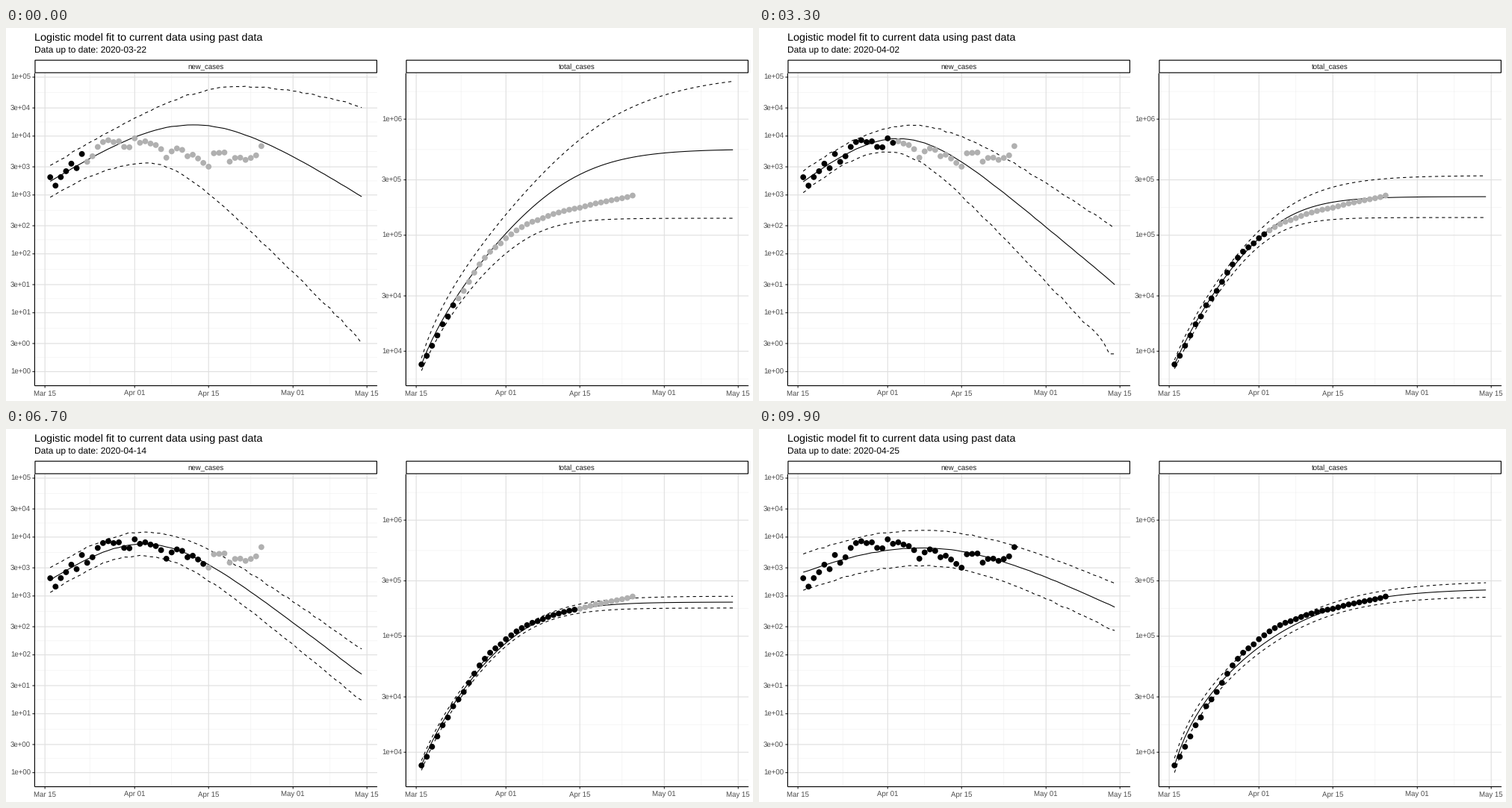
Write a matplotlib script that moves like this. It is 1000 px wide and 500 px high and loops after 10000 ms.

```python
import numpy as np
import matplotlib.pyplot as plt
from matplotlib.animation import FuncAnimation
from matplotlib.patches import Circle, Rectangle

plt.rcParams["font.family"] = "Liberation Sans"
plt.rcParams["text.hinting"] = "none"

W, H = 1000, 500
FRAMES, INTERVAL = 100, 100
FITS = 35                      # one fit per day from 2020-03-22
PX = 0.72                      # points per pixel at 100 dpi
LEFT, RIGHT, PANEL_W = 38.36, 535.36, 458.64
STRIP, TOP, BOTTOM = 42.6, 60.5, 479.5
LINE = 1.16
GREY = "#b0b0b0"
DAYS = np.arange(60)           # 2020-03-16 to 2020-05-14

# Observed daily counts in tens, from 2020-03-16
NEW = 10 * np.array([
    200, 144, 201, 253, 340, 285, 496, 365, 454, 654, 791, 850, 790, 814,
    654, 645, 915, 768, 814, 746, 703, 600, 429, 549, 617, 582, 454, 482,
    416, 350, 302, 510, 518, 526, 368, 425, 430, 394, 425, 470, 675])
TOTAL = 7700 + np.cumsum(NEW) - NEW[0]

# Key poses of the epidemic curve; heights and spreads are log10
KEY_FITS = [0, 3, 8, 15, 20, 34]
POSES = {
    "start": [3.23, 3.23, 3.22, 3.23, 3.23, 3.40],
    "start_spread": [0.27, 0.20, 0.20, 0.17, 0.18, 0.31],
    "peak": [4.19, 4.28, 4.00, 3.90, 3.90, 3.815],
    "peak_spread": [0.65, 0.50, 0.27, 0.16, 0.17, 0.30],
    "day": [27, 27.5, 19.5, 16.2, 16.5, 22.5],
    "day_spread": [8.8, 8.2, 3.3, 0.4, 0.4, 0],
    "fall": [0.130, 0.143, 0.165, 0.184, 0.173, 0.100],
    "fall_spread": [0.45, 0.28, 0.29, 0.13, 0.08, 0.07],
    "total": [5.736, 5.760, 5.398, 5.244, 5.265, 5.398],
    "total_spread": [0.59, 0.49, 0.265, 0.066, 0.047, 0.0625],
}
BANDS = {0: "-", 1: (0, (4, 4)), -1: (0, (4, 4))}   # median, upper, lower


def new_y(value):
    return 460.6 - 78.94 * np.log10(value)


def total_y(value):
    return 433.3 - 155.55 * (np.log10(value) - 4)


def day_x(left, day):
    """The 59 days of the fit fill the panel but for 5 % on either side."""
    return left + PANEL_W * (np.asarray(day) / 59 + 0.05) / 1.1


def fit_curves(fit, band):
    """Daily and total counts of one band: a logistic wave, sech squared."""
    pose = {k: np.interp(fit, KEY_FITS, v) for k, v in POSES.items()}

    def at(name):
        return pose[name] + band * pose[name + "_spread"]

    peak, day = 10 ** at("peak"), at("day")
    start = 10 ** at("start")
    rise = 2 * np.arccosh(np.sqrt(peak / start)) / day
    fall = pose["fall"] * np.exp(-band * pose["fall_spread"])
    rate = np.where(DAYS < day, rise, fall)
    new = peak / np.cosh(rate * (DAYS - day) / 2) ** 2

    first = 7700 * 10 ** (0.2 * band * pose["start_spread"])
    grown = np.cumsum(new) - new[0]
    total = first + (10 ** at("total") - first) * grown / grown[-1]
    return new, total


def simulated(new, fit, band):
    """Whole counts with the slight roughness of simulated quantiles."""
    rng = np.random.default_rng(10 * fit + band + 1)
    noise = rng.normal(0, 0.015 if band else 0.004, len(new))
    return np.maximum(np.round(new * np.exp(noise)), 0.6)


fig = plt.figure(figsize=(W / 100, H / 100), dpi=100, facecolor="white")
ax = fig.add_axes([0, 0, 1, 1])
ax.set(xlim=(0, W), ylim=(H, 0))
ax.axis("off")


def line(xs, ys, color="black", width=LINE, z=7, style="-"):
    return ax.plot(xs, ys, color=color, lw=width * PX, ls=style, zorder=z,
                   solid_capstyle="butt", snap=False)[0]


def label(x, y, text, size, color="black", ha="left"):
    return ax.text(x, y, text, fontsize=size * PX, color=color, ha=ha,
                   va="baseline", zorder=9)


def with_minor(ticks):
    """Midpoints between ticks, continued one step past both ends."""
    t = np.asarray(ticks, float)
    t = np.r_[2 * t[0] - t[1], t, t[-1] + t[1] - t[0]]
    return (t[1:] + t[:-1]) / 2


def draw_panel(left, name, to_y, breaks):
    right = left + PANEL_W
    dates = {"Mar 15": -1, "Apr 01": 16, "Apr 15": 30, "May 01": 46,
             "May 15": 60}
    xs = day_x(left, list(dates.values()))
    logs = np.log10([float(b) for b in breaks])

    for x in with_minor(xs):
        if left < x < right:
            line([x, x], [TOP, BOTTOM], "#f0f0f0", LINE / 2, 1)
    for y in to_y(10 ** with_minor(logs)):
        if TOP < y < BOTTOM - 1:
            line([left, right], [y, y], "#f0f0f0", LINE / 2, 1)

    for x, text in zip(xs, dates):
        line([x, x], [TOP, BOTTOM], "#e0e0e0", LINE, 2)
        line([x, x], [BOTTOM, BOTTOM + 3], "#333333", LINE, 6)
        label(x, 493.4, text, 9.6, "#4d4d4d", "center")
    for y, text in zip(to_y(10 ** logs), breaks):
        line([left, right], [y, y], "#e0e0e0", LINE, 2)
        line([left - 3, left], [y, y], "#333333", LINE, 6)
        label(left - 5.4, y + 3.5, text, 9.6, "#4d4d4d", "right")

    line([left, left], [TOP, BOTTOM])
    line([left, right], [BOTTOM, BOTTOM])
    # The strip border lies wholly inside the strip
    ax.add_patch(Rectangle((left + LINE / 2, STRIP + LINE / 2),
                           PANEL_W - LINE, TOP - STRIP - LINE, fc="white",
                           ec="black", lw=LINE * PX, zorder=8, snap=False))
    label((left + right) / 2, 55.4, name, 9.6, "#1a1a1a", "center")


def add_series(left, to_y, values):
    """Observed points and the three still empty fit curves of a panel."""
    dots = [ax.add_patch(Circle(xy, 3.9, lw=0))
            for xy in zip(day_x(left, np.arange(len(values))), to_y(values))]
    curves = {band: line([], [], width=1.07, z=3, style=style)
              for band, style in BANDS.items()}
    return dots, curves


powers = [f"{m}e+{p:02d}" for p in range(7) for m in (1, 3)]
draw_panel(LEFT, "new_cases", new_y, powers[:11])
draw_panel(RIGHT, "total_cases", total_y, powers[8:13])
label(38.36, 17, "Logistic model fit to current data using past data", 14.4)
subtitle = label(38.36, 34, "", 12)

new_dots, new_lines = add_series(LEFT, new_y, NEW)
total_dots, total_lines = add_series(RIGHT, total_y, TOTAL)


def update(frame):
    # The caption truncates the running date, the data snap to the nearest one
    shown = frame * (FITS - 1) // (FRAMES - 1)
    fit = (2 * frame + 1) * (FITS - 1) // (2 * (FRAMES - 1))
    subtitle.set_text(f"Data up to date: {np.datetime64('2020-03-22') + shown}")

    for dots in (new_dots, total_dots):
        for day, dot in enumerate(dots):
            past = day < fit + 7
            dot.set(facecolor="black" if past else GREY,
                    zorder=5 if past else 4)
    for band in BANDS:
        new, total = fit_curves(fit, band)
        new_lines[band].set_data(day_x(LEFT, DAYS),
                                 new_y(simulated(new, fit, band)))
        total_lines[band].set_data(day_x(RIGHT, DAYS), total_y(total))


anim = FuncAnimation(fig, update, frames=FRAMES, interval=INTERVAL,
                     repeat=True, repeat_delay=0)
plt.show()
```
